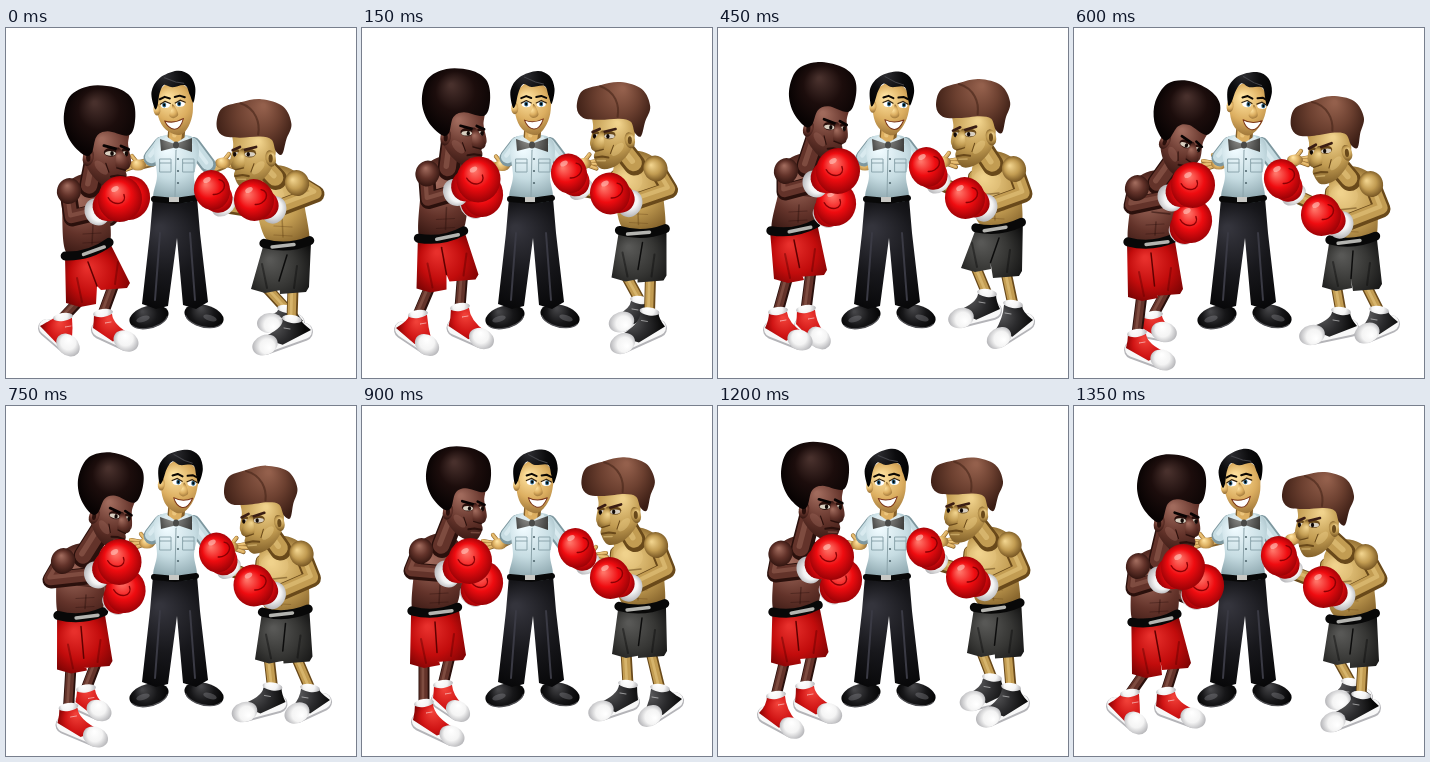
Animation, 350 px wide and 350 px high, one loop 1.5 s. Source, as an HTML page with a canvas:

```html
<!DOCTYPE html>
<html lang="en">
<head>
<meta charset="utf-8">
<title>Boxers and referee</title>
<style>
html, body { margin: 0; width: 100%; height: 100%; overflow: hidden; background: #fff; }
canvas { display: block; width: 350px; height: 350px; }
</style>
</head>
<body>
<canvas id="stage" width="350" height="350"></canvas>
<script>
const c = document.getElementById('stage').getContext('2d');
const STEP = 150, COUNT = 10, _ = null;

// A gap in a track is the mean of its neighbours.
const track = list => list.map((v, i) => v || list[(i + COUNT - 1) % COUNT]
  .map((n, k) => (n + list[(i + 1) % COUNT][k]) / 2));

const SKIN = {
  dark: ['#a06a5c', '#63332a', '#2a100c'],
  gold: ['#f0d28c', '#c29c52', '#69491a'],
  ref: ['#ffe3a0', '#dcae60', '#86602a']
};
const RED = ['#ff7468', '#ef0c10', '#8c0004'];
const WHITE = ['#ffffff', '#f4f4f4', '#a8a8ac'];

const left = {
  s: 1, skin: SKIN.dark, cloth: ['#e8302c', '#c20c0c', '#600000'],
  shoe: ['#f04038', '#d01414', '#780000'], hair: ['#48302c', '#1c0d0c', '#080303'],
  r: 22, cuff: [-23, 13], farCuff: [-12, 13], faceX: 0
};
const right = {
  s: -1, skin: SKIN.gold, cloth: ['#585856', '#363634', '#0c0c0c'],
  shoe: ['#5a5a5c', '#2c2c2e', '#080808'], hair: ['#94604c', '#6c4030', '#3a1d14'],
  r: 20, cuff: [-20, 10], farCuff: [-12, 16], faceX: -7
};

// x, y, size, forward tilt
left.head = track([[93, 90, 1.1, .02], _, [94, 53, 1, 0], [104, 65, 1.03, .12], [112, 83, 1, .36], _,
  [96, 70, 1, .03], [96, 54, 1.03, 0], _, [97, 80, 1.06, .06]]);
right.head = track([[248, 93, 1.04, 0], _, [255, 58, 1, 0], [255, 73, 1.03, .04], [253, 90, 1.02, .1], _,
  [256, 73, 1.02, .04], [254, 58, 1, 0], _, [244, 87, 1, 0]]);

// shoulder x, y, elbow x, y
left.arm = track([[62, 163, 66, 190], _, [67, 128, 67, 155], [67, 143, 67, 164], [62, 160, 58, 178], [56, 155, 45, 174],
  [58, 145, 50, 165], [60, 135, 55, 154], _, [63, 160, 60, 182]]);
right.arm = track([[292, 155, 310, 166], _, [297, 126, 305, 158], [297, 141, 306, 166], [298, 156, 308, 181], _,
  [295, 139, 305, 164], [292, 126, 303, 156], _, [293, 151, 305, 173]]);

// near glove x, y, far glove x, y
left.gloves = track([[114, 171, 124, 170], _, [119, 132, 118, 164], [120, 143, 118, 176], [119, 157, 118, 193], _,
  [108, 155, 121, 177], [119, 141, 118, 169], _, [109, 161, 130, 180]]);
right.gloves = track([[248, 172, 206, 162], _, [248, 159, 208, 129], [247, 170, 209, 139], [247, 187, 208, 151], _,
  [248, 172, 214, 142], [247, 162, 208, 133], _, [249, 181, 205, 150]]);

// belt x, y, angle
left.hip = track([[82, 224, -.3], _, [77, 195, -.02], [76, 202, -.16], [77, 215, -.08], _,
  [73, 206, -.08], [75, 196, -.12], _, [81, 215, -.18]]);
right.hip = track([[281, 217, -.06], _, [280, 192, -.02], [281, 200, -.12], [279, 213, -.08], _,
  [280, 202, -.06], [280, 191, -.08], _, [279, 213, -.12]]);

left.knees = track([[74, 272, 108, 256], _, [63, 243, 93, 239], [70, 248, 93, 243], [68, 266, 93, 262], _,
  [62, 255, 88, 250], [62, 242, 88, 236], _, [72, 265, 101, 258]]);
right.knees = track([[259, 258, 287, 260], _, [268, 235, 290, 237], [257, 237, 288, 244], [262, 256, 292, 257], _,
  [264, 245, 289, 246], [263, 236, 291, 237], _, [263, 252, 289, 256]]);

// ankle, heel, toe
left.shoeA = track([[57, 290, 41, 298, 62, 317], [56, 287, 41, 300, 65, 317], [52, 280, 47, 298, 73, 314],
  [60, 284, 54, 300, 82, 312], [63, 306, 59, 320, 89, 332], _, [62, 298, 58, 314, 90, 330],
  [57, 285, 52, 302, 81, 318], [58, 290, 48, 307, 74, 322], [56, 288, 41, 298, 62, 317]]);
left.shoeB = track([[97, 286, 94, 300, 120, 313], _, [99, 274, 93, 296, 119, 308], [88, 282, 85, 296, 101, 310],
  [79, 288, 75, 300, 90, 304], _, [81, 279, 78, 292, 96, 305], [82, 274, 79, 292, 104, 303], _, [92, 286, 89, 300, 119, 312]]);
right.shoeA = track([[281, 282, 290, 293, 264, 295], _, [275, 264, 276, 279, 255, 293], [269, 266, 275, 281, 243, 290],
  [267, 284, 276, 298, 238, 307], _, [266, 279, 269, 294, 239, 305], [271, 268, 276, 285, 245, 296], _, [277, 277, 290, 289, 264, 294]]);
right.shoeB = track([[286, 292, 298, 302, 259, 317], _, [289, 277, 294, 295, 262, 314], [295, 277, 308, 292, 281, 310],
  [305, 283, 317, 294, 293, 305], [304, 283, 317, 294, 291, 307], [298, 283, 313, 293, 288, 310],
  [299, 274, 308, 291, 282, 306], _, [287, 290, 298, 300, 259, 316]]);

// head lean, left hand x, y, right hand x, y
const REF = track([[-.08, 129, 137, 220, 135], _, [.06, 145, 138, 229, 136], [.07, 144, 137, 228, 134],
  [.11, 142, 136, 224, 132], _, [.06, 134, 138, 231, 150], [0, 147, 140, 229, 138], _, [-.1, 129, 137, 222, 133]]);

function shade(x, y, r, [light, mid, dark]) {
  const g = c.createRadialGradient(x - r * .25, y - r * .35, r * .05, x, y, r * 1.1);
  g.addColorStop(0, light);
  g.addColorStop(.5, mid);
  g.addColorStop(1, dark);
  return g;
}

function ball(x, y, rx, ry, fill, turn = 0) {
  c.save();
  c.translate(x, y);
  c.rotate(turn);
  c.fillStyle = Array.isArray(fill) ? shade(0, 0, Math.max(rx, ry), fill) : fill;
  c.beginPath();
  c.ellipse(0, 0, rx, ry, 0, 0, 7);
  c.fill();
  c.restore();
}

// Smooth closed curve through the points
function blob(pts, fill) {
  const n = pts.length, at = i => pts[(i + n) % n];
  c.beginPath();
  c.moveTo(...pts[0]);
  for (let i = 0; i < n; i++) {
    const [p, a, b, q] = [at(i - 1), at(i), at(i + 1), at(i + 2)];
    c.bezierCurveTo(a[0] + (b[0] - p[0]) / 6, a[1] + (b[1] - p[1]) / 6,
      b[0] - (q[0] - a[0]) / 6, b[1] - (q[1] - a[1]) / 6, ...b);
  }
  c.fillStyle = fill;
  c.fill();
}

function poly(pts, fill) {
  c.beginPath();
  pts.forEach(p => c.lineTo(...p));
  c.closePath();
  c.fillStyle = fill;
  c.fill();
}

function line(pts, width, color, dx = 0, dy = 0) {
  c.beginPath();
  pts.forEach(([x, y]) => c.lineTo(x + dx, y + dy));
  c.lineWidth = width;
  c.strokeStyle = color;
  c.stroke();
}

function limb(pts, w, [light, mid, dark]) {
  line(pts, w, dark);
  line(pts, w * .75, mid, -w * .04, -w * .07);
  c.globalAlpha = .45;
  line(pts, w * .25, light, -w * .1, -w * .15);
  c.globalAlpha = 1;
}

function shoe([ax, ay, hx, hy, tx, ty], s, tone) {
  const turn = Math.atan2(ty - hy, tx - hx);
  line([[hx, hy + 2], [tx, ty + 1]], 18, '#b4b4b8');
  line([[hx, hy + 1], [tx, ty]], 16, '#f8f8f8');
  c.beginPath();
  c.moveTo(ax - 9 * s, ay);
  c.quadraticCurveTo(ax - 9 * s, hy - 8, hx - 7 * s, hy);
  c.lineTo(hx + (tx - hx) * .65 - 4 * s, hy + (ty - hy) * .65 + 5);
  c.lineTo(tx + 4 * s, ty - 7);
  c.quadraticCurveTo(ax + 10 * s, (ay + ty) / 2 - 3, ax + 9 * s, ay);
  c.fillStyle = shade((ax + tx) / 2, (ay + ty) / 2, 24, tone);
  c.fill();
  ball(tx, ty, 13, 10, WHITE, turn);
  ball(ax, ay - 1, 10, 4, WHITE, -.15 * s);
  line([[ax + 2 * s, ay + 9], [ax + 8 * s, ay + 8]], 1, '#ffffff80');
}

function glove(x, y, b, near) {
  const { s, r } = b, [dx, dy] = near ? b.cuff : b.farCuff;
  const turn = Math.atan2(dy, dx * s);
  ball(x + dx * s, y + dy, near ? 12 : 9, near ? 14 : 13, WHITE, turn);
  ball(x + dx * s * .4, y + dy * .4, r * .85, r * .75, RED, turn);
  ball(x, y, near ? r : r - 2, near ? r + 1 : r, RED, .2 * s);
  c.beginPath();
  c.ellipse(x - 4 * s, y - 3, 9, 7, .5 * s, -.8, 2.3);
  c.lineWidth = 1.4;
  c.strokeStyle = '#8a0004';
  c.stroke();
  ball(x - 5, y - 10, 4, 2.5, '#ffb8b0b0', -.5);
}

function head(b, [x, y, size, tilt]) {
  const k = b.faceX, skin = b.skin;
  c.save();
  c.translate(x, y);
  c.scale(b.s * size, size);
  c.rotate(tilt);
  blob([[2, 0], [26, 8], [27, 24], [30, 40], [25, 46], [26, 53], [19, 64], [3, 60], [-11, 43], [-13, 20]]
    .map(p => [p[0] + k, p[1]]), shade(12 + k, 32, 36, skin));
  c.translate(k, 0);
  ball(-9, 36, 5, 8, skin, .2);
  ball(-9, 36, 2, 4, skin[2]);
  ball(3, 45, 8, 4, skin[0] + '60', .8);
  for (const [ex, w] of [[11, 6], [24, 3.5]]) {
    ball(ex, 31, w, 4, skin[2]);
    ball(ex, 32, w - 1, 2.2, '#d8cfc0');
    ball(ex + 1.5, 32, 1.6, 2.2, '#100806');
    line([[ex - w, 25], [ex + w, 28]], 2.6, b.hair[2]);
  }
  blob([[17, 27], [22, 30], [29, 42], [25, 47], [17, 45], [16, 39]], shade(21, 38, 11, skin));
  line([[17, 45], [25, 47]], 1.2, skin[2]);
  line([[12, 53], [18, 52], [25, 53]], 2, skin[2]);
  line([[15, 56], [23, 56]], 1.5, skin[0] + '80');
  line([[7, 41], [10, 49]], 1, skin[2]);
  c.translate(-k, 0);
  if (b === left) {
    blob([[-32, 2], [-27, -19], [-9, -29], [14, -28], [29, -19], [33, -2], [28, 15], [8, 12], [-2, 17], [-6, 32], [-13, 34], [-26, 21]],
      shade(4, -2, 33, b.hair));
  } else {
    blob([[36, 4], [31, -12], [13, -18], [-7, -21], [-28, -14], [-36, 3], [-31, 18], [-27, 32], [-21, 29], [-17, 18], [-6, 15], [14, 16], [30, 14]],
      shade(0, -2, 36, b.hair));
    c.beginPath();
    c.moveTo(13, -17);
    c.bezierCurveTo(-2, -12, -6, 2, -4, 13);
    c.lineWidth = 2;
    c.strokeStyle = '#472619a0';
    c.stroke();
  }
  c.restore();
}

function shorts(b, [x, y, turn], [ax, ay, bx, by]) {
  const w = 24, dx = Math.cos(turn) * w, dy = Math.sin(turn) * w;
  poly([[x - dx, y - dy], [x + dx, y + dy], [bx + 16, by - 1], [bx + 13, by + 4], [bx - 13, by + 6],
    [(ax + bx) / 2, (ay + by) / 2 - 6], [ax + 16, ay + 4], [ax, ay + 7], [ax - 14, ay + 3]],
    shade((ax + bx) / 2, y + 28, 38, b.cloth));
  line([[x, y + 10], [(ax + bx) / 2, (ay + by) / 2 - 6]], 1.5, b.cloth[2]);
  line([[ax - 3, ay - 22], [ax + 2, ay + 2]], 2, b.cloth[2] + '70');
  line([[bx + 4, by - 22], [bx + 1, by]], 2, b.cloth[2] + '70');
  c.save();
  c.translate(x, y);
  c.rotate(turn);
  c.beginPath();
  c.moveTo(-23, -3);
  c.quadraticCurveTo(0, 5, 23, -3);
  c.lineWidth = 9;
  c.strokeStyle = '#080808';
  c.stroke();
  c.beginPath();
  c.moveTo(-10 + 5 * b.s, 1);
  c.lineTo(12 + 5 * b.s, 0);
  c.lineWidth = 3.5;
  c.strokeStyle = '#b4b4b0';
  c.stroke();
  c.restore();
}

function boxer(b, i) {
  const { s, skin } = b;
  const [sx, sy, ex, ey] = b.arm[i], [nx, ny, fx, fy] = b.gloves[i];
  const hip = b.hip[i], knees = b.knees[i], hd = b.head[i];
  const A = b.shoeA[i], B = b.shoeB[i];
  const legA = () => { limb([[knees[0], knees[1]], [A[0], A[1]]], 11, skin); shoe(A, s, b.shoe); };
  const legB = () => { limb([[knees[2], knees[3]], [B[0], B[1]]], 11, skin); shoe(B, s, b.shoe); };
  if (s > 0) { legB(); legA(); } else { legA(); legB(); }

  limb([[sx + 40 * s, sy + 8], [sx + 42 * s, sy + 28], [fx + b.farCuff[0] * s, fy + b.farCuff[1]]], 14, skin);
  blob([[hip[0] - 22 * s, hip[1]], [sx - 6 * s, sy + 18], [sx - 7 * s, sy], [sx + 7 * s, sy - 14], [sx + 26 * s, sy - 17],
    [sx + 42 * s, sy - 4], [sx + 42 * s, sy + 22], [hip[0] + 21 * s, hip[1] - 6], [hip[0], hip[1] + 3]],
    shade(sx + 20 * s, sy + 25, 46, skin));
  ball(sx + 28 * s, sy + 12, 14, 12, skin[0] + '38');
  line([[sx + 16 * s, sy + 24], [sx + 34 * s, sy + 26]], 1.5, skin[2] + '90');
  line([[hip[0] + 5 * s, sy + 34], [hip[0] + 4 * s, hip[1] - 8]], 1.5, skin[2] + '70');
  for (const d of [18, 9]) line([[hip[0] - 5 * s, hip[1] - d], [hip[0] + 13 * s, hip[1] - d - 1]], 1.2, skin[2] + '60');
  shorts(b, hip, knees);
  limb([[sx + 22 * s, sy - 4], [hd[0] - 3 * s, hd[1] + 38]], 22, skin);
  head(b, hd);
  glove(fx, fy, b, false);
  limb([[sx, sy], [ex, ey], [nx + b.cuff[0] * s, ny + b.cuff[1]]], 17, skin);
  ball(sx + s, sy, 12, 13, skin, .3 * s);
  glove(nx, ny, b, true);
}

function hand(x, y, s) {
  for (const [dx, dy] of [[13, -3], [14, 1], [10, 5], [3, -9]])
    limb([[x - 4 * s, y], [x + dx * s, y + dy]], 4.2, SKIN.ref);
  ball(x - 3 * s, y, 8, 5.5, SKIN.ref);
}

function refHead(lean) {
  c.save();
  c.translate(171, 107);
  c.rotate(lean);
  blob([[-17, -42], [-18, -24], [-13, -9], [-3, -1], [6, -1], [14, -11], [18, -25], [17, -43], [0, -54]],
    shade(1, -27, 31, SKIN.ref));
  ball(-18, -27, 3.5, 6, SKIN.ref);
  blob([[-20, -28], [-22, -45], [-13, -58], [5, -64], [17, -59], [22, -46], [19, -31], [16, -39], [12, -49], [-1, -48], [-9, -51], [-14, -43], [-17, -31]],
    shade(-2, -52, 26, ['#2c2c30', '#0c0c0e', '#000']));
  line([[-8, -58], [3, -53], [11, -51]], 1, '#45454a');
  c.translate(lean * 40 + 1, 0);
  for (const x of [-7, 8]) {
    line([[x - 5, -37 - (x < 0 ? 0 : 1)], [x, -39], [x + 5, -37]], 2, '#0c0804');
    ball(x, -31, 4.6, 3.2, '#fff');
    ball(x + lean * 15, -31, 2, 2.5, '#2c6686');
    ball(x + lean * 15, -31, 1, 1.4, '#000');
    line([[x - 5, -32], [x, -34.5], [x + 5, -32]], 1.2, '#332008');
  }
  blob([[0, -31], [3, -27], [5, -20], [0, -17], [-4, -20], [-1, -26]], shade(0, -23, 7, SKIN.ref));
  c.beginPath();
  c.moveTo(-9, -15);
  c.quadraticCurveTo(0, -11, 10, -16);
  c.quadraticCurveTo(6, -5, 0, -6);
  c.quadraticCurveTo(-6, -7, -9, -15);
  c.fillStyle = '#fff';
  c.fill();
  c.lineWidth = 1;
  c.strokeStyle = '#7a3418';
  c.stroke();
  c.restore();
}

function refShoe(x, y, s) {
  ball(x, y, 20, 11, ['#454548', '#161618', '#000'], -.25 * s);
  ball(x - 6 * s, y + 2, 7, 3, '#8a8a9060', -.3 * s);
  c.beginPath();
  c.ellipse(x, y + 1, 19, 10, -.25 * s, .3, 2.8);
  c.lineWidth = 1.2;
  c.strokeStyle = '#505054';
  c.stroke();
}

function referee([lean, lx, ly, rx, ry]) {
  const cloth = ['#f0fbff', '#c6dce2', '#7d979f'];
  const pants = ['#34343c', '#17171b', '#050506'];
  refShoe(143, 289, 1);
  refShoe(198, 288, -1);
  poly([[147, 170], [191, 170], [194, 205], [202, 274], [190, 281], [177, 277], [171, 210], [162, 278], [150, 281], [136, 276], [144, 205]],
    shade(169, 222, 62, pants));
  line([[154, 205], [149, 272]], 2, '#3a3a44');
  line([[184, 205], [189, 272]], 2, '#3a3a44');

  limb([[154, 122], [146, 134], [lx + 4, ly]], 10, SKIN.ref);
  limb([[189, 122], [204, 142], [rx - 4, ry + 2]], 10, SKIN.ref);
  hand(lx, ly, -1);
  hand(rx, ry, 1);
  limb([[156, 117], [146, 130]], 17, cloth);
  limb([[187, 117], [202, 137]], 16, cloth);
  blob([[152, 110], [170, 106], [188, 110], [193, 124], [188, 148], [190, 171], [169, 174], [148, 171], [151, 148], [148, 122]],
    shade(171, 135, 40, cloth));
  line([[170, 122], [169, 169]], 1, '#8ba3aa');
  for (const y of [131, 143, 155]) ball(172, y, 1.1, 1.1, '#526870');
  for (const x of [154, 177]) {
    c.lineWidth = 1;
    c.strokeStyle = '#8ca5ad';
    c.strokeRect(x, 131, 11, 13);
    line([[x, 135], [x + 11, 135]], 1, '#8ca5ad');
  }
  line([[148, 171], [169, 173], [190, 170]], 6, '#080808');
  c.fillStyle = '#c8c8c4';
  c.fillRect(163, 169, 10, 5);

  limb([[171, 98], [170, 110]], 17, SKIN.ref);
  poly([[160, 108], [170, 115], [181, 108], [187, 117], [170, 119], [154, 117]], '#dceaee');
  poly([[154, 111], [169, 116], [186, 110], [186, 124], [171, 119], [155, 123]], shade(170, 116, 18, ['#92928e', '#646462', '#30302e']));
  ball(170, 117, 3, 3.5, '#4a4a48');
  refHead(lean);
}

function draw(now) {
  const i = Math.floor(now / STEP) % COUNT;
  c.fillStyle = '#fff';
  c.fillRect(0, 0, 350, 350);
  c.lineCap = c.lineJoin = 'round';
  referee(REF[i]);
  boxer(left, i);
  boxer(right, i);
}

let start;
function tick(now) {
  if (start === undefined) start = now;
  draw(now - start);
  requestAnimationFrame(tick);
}
draw(0);
requestAnimationFrame(tick);
</script>
</body>
</html>
```
